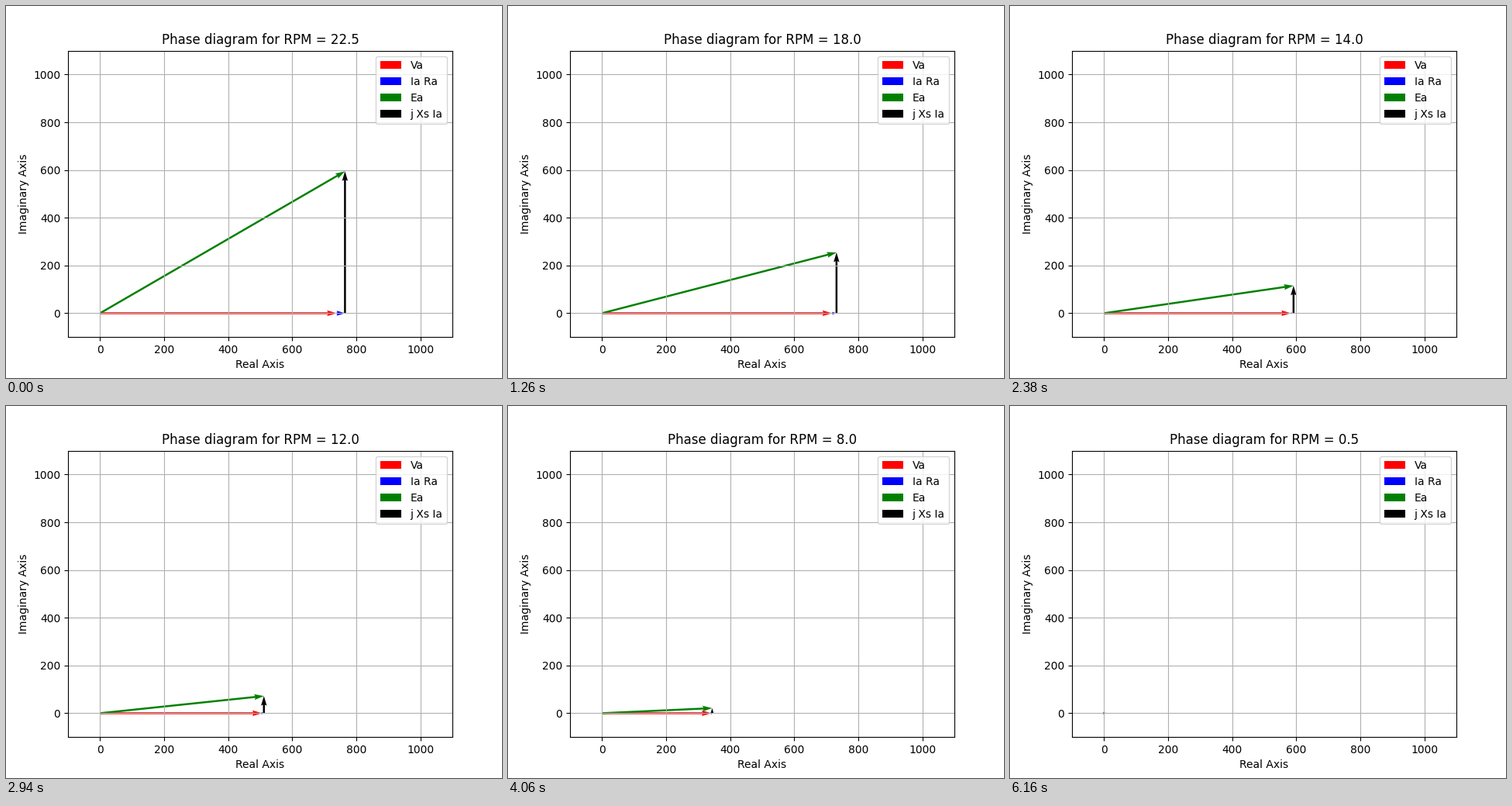
Write a matplotlib script that moves like this. It is 640x480 px and loops after 6300 ms.

```python
import numpy as np
import matplotlib.pyplot as plt
from matplotlib.animation import FuncAnimation
from matplotlib.patches import Patch

FRAMES = 45
INTERVAL = 140
RPM_STEP = 0.5
CUT_IN = 3.0         # no generation below this speed
EMF = 43.05          # induced voltage per rpm
POWER = 0.0019144    # sin(2 * load angle) per rpm squared
REACTANCE = 1.774    # synchronous reactance per rpm
RESISTANCE = 1.75

COLORS = {"Va": "red", "Ia Ra": "blue", "Ea": "green", "j Xs Ia": "black"}

fig, ax = plt.subplots(figsize=(6.4, 4.8), dpi=100)
ax.set_xlim(-100, 1100)
ax.set_ylim(-100, 1100)
ax.set_xlabel("Real Axis")
ax.set_ylabel("Imaginary Axis")
ax.grid()
ax.legend(handles=[Patch(facecolor=c, linewidth=0, label=name)
                   for name, c in COLORS.items()], loc="upper right")
title = ax.set_title("")
arrows = []


def phasors(rpm):
    """Return (start, vector) of each phasor as complex numbers."""
    if rpm < CUT_IN:
        return [(0j, 0j)] * 4
    angle = np.arcsin(POWER * rpm**2) / 2
    ea = EMF * rpm * np.exp(1j * angle)
    ia = ea.imag / (REACTANCE * rpm)
    drop = RESISTANCE * ia
    va = ea.real - drop
    return [(0j, va + 0j), (va + 0j, drop + 0j),
            (0j, ea), (ea.real + 0j, 1j * ea.imag)]


def update(frame):
    rpm = RPM_STEP * (FRAMES - frame)
    title.set_text(f"Phase diagram for RPM = {rpm:.1f}")
    while arrows:
        arrows.pop().remove()
    for (start, vec), color in zip(phasors(rpm), COLORS.values()):
        arrows.append(ax.quiver(start.real, start.imag, vec.real, vec.imag,
                                color=color, angles="xy", scale_units="xy",
                                scale=1, width=0.005))
    return [title, *arrows]


anim = FuncAnimation(fig, update, frames=FRAMES, init_func=lambda: [],
                     interval=INTERVAL, repeat=True, repeat_delay=0)
plt.show()
```
